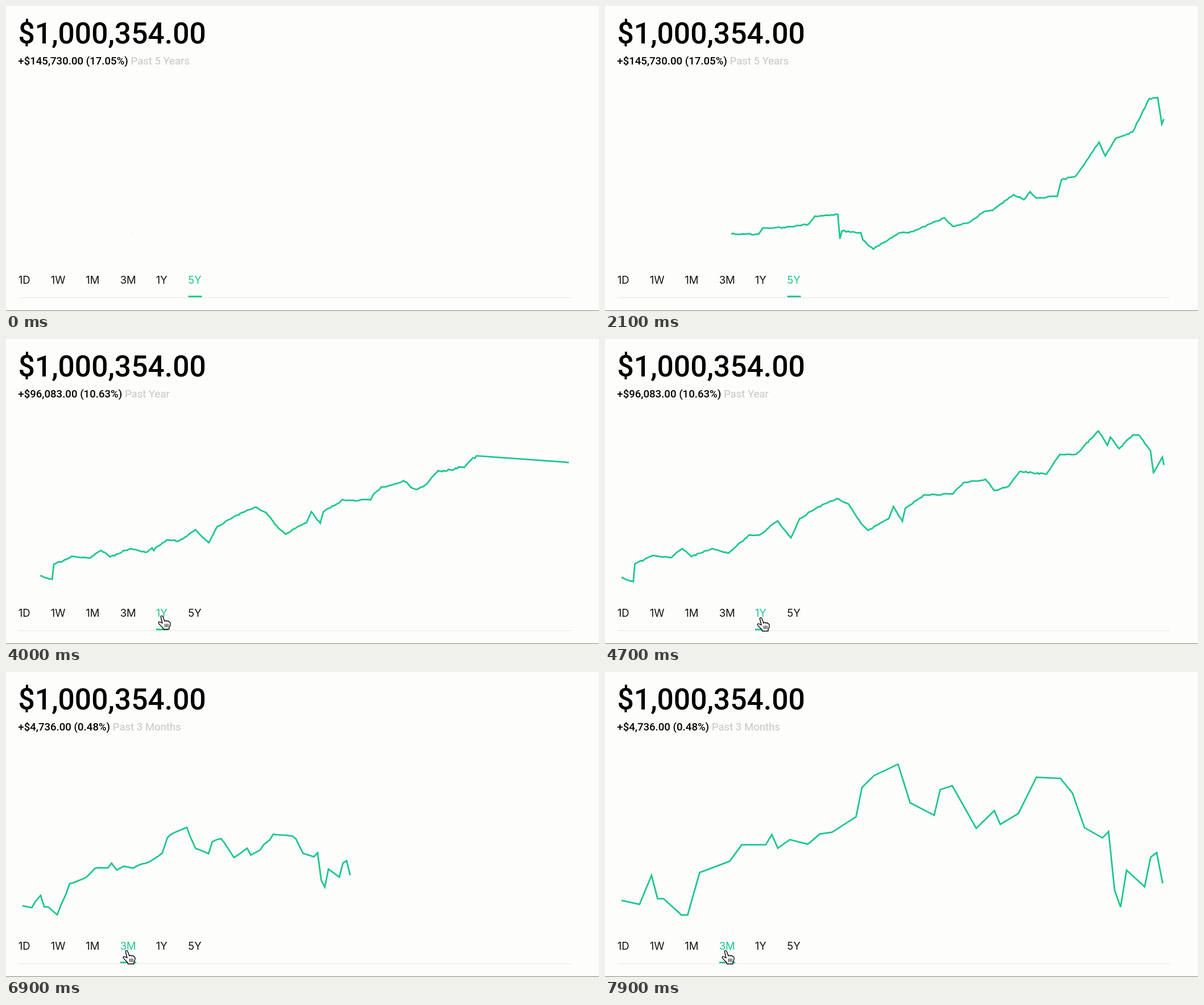
Recreate the animation shown at these times as an HTML page. Size 1043 px wide and 537 px high, loop 8 s.

```html
<!DOCTYPE html>
<html lang="en">
<head>
<meta charset="utf-8">
<title>Portfolio chart</title>
<style>
  html, body { margin: 0; width: 100%; height: 100%; overflow: hidden; background: #fdfdfb; }
  svg { display: block; width: 100%; height: 100%; }
  text { font-family: Roboto, sans-serif; }
  #total { font-size: 51.6px; font-weight: 500; }
  #summary { font-size: 18.6px; }
  #gain { font-weight: 500; }
  #span { fill: #c6c6c6; }
  #tabs text { font: 18.5px Inter, sans-serif; fill: #111; }
  #tabs text.on { fill: #1ec690; }
</style>
</head>
<body>
<svg viewBox="0 0 1043 537">
  <clipPath id="plot"><rect width="990" height="460"/></clipPath>
  <text id="total" x="21.5" y="65.7">$1,000,354.00</text>
  <text id="summary" x="21.3" y="103"><tspan id="gain"></tspan> <tspan id="span"></tspan></text>
  <g clip-path="url(#plot)">
    <polyline id="line" pathLength="1" fill="none" stroke="#1ec690" stroke-width="2.8"/>
  </g>
  <g id="tabs"></g>
  <rect x="22" y="513" width="972" height="1" fill="#e6e6e5"/>
  <rect id="underline" y="510" height="2.8" fill="#1ec690"/>
  <rect y="536" width="1043" height="1" fill="#85836c"/>
  <g id="hand" stroke="#000" stroke-width="1.4" stroke-linejoin="round">
    <path fill="#fff" d="M272.5 490C271.5 487 275 486.5 276 489L279 497C280 495.5 282 495.5 283 497
      C284.5 495.5 286 496.5 286.5 498C288 497.5 289 499 289 501C289.3 504 288 506 287 508V511H276.5
      L276 508.5C274 506.5 270 503 268.5 500.5C267.5 498.5 269.5 497 271.5 498.5L275 500.5Z"/>
    <path stroke-width="1.1" d="M279.7 501.5v6M282.4 501.5v6M285 501.5v6"/>
  </g>
</svg>
<script>
const LOOP = 8000, DRAW_TIME = 1500;
const LEFT = 29, WIDTH = 954;
const ENTRY = [1946, 289]; // where points without a predecessor fly in from
const $ = id => document.getElementById(id);
const mix = (a, b, p) => a + (b - a) * p;
const noise = i => { const n = Math.sin(i * 127.1) * 43758.5; return (n - Math.floor(n)) * 2 - 1; };

// CSS "ease" curve, cubic-bezier(.25, .1, .25, 1)
function ease(t) {
  if (t <= 0) return 0;
  if (t >= 1) return 1;
  const bezier = (a, b, s) => 3 * a * s * (1 - s) ** 2 + 3 * b * s * s * (1 - s) + s ** 3;
  let lo = 0, hi = 1;
  for (let i = 0; i < 24; i++) {
    const mid = (lo + hi) / 2;
    if (bezier(.25, .25, mid) < t) lo = mid; else hi = mid;
  }
  return bezier(.1, 1, lo);
}

// Samples the price: straight runs between turning points, with a little random roughness.
function series(count, xAt, rough, turns) {
  const xs = Array.from({ length: count }, (_, i) => xAt(i));
  const snap = x => xs.reduce((best, v) => Math.abs(v - x) < Math.abs(best - x) ? v : best);
  const keys = turns.trim().split(/\s+/).map(pair => {
    const [x, y] = pair.split(',').map(Number);
    return [snap(x), y];
  });
  return xs.map((x, i) => {
    const j = keys.findIndex(k => k[0] >= x);
    if (keys[j][0] === x) return [x, keys[j][1]];
    const [ax, ay] = keys[j - 1], [bx, by] = keys[j];
    return [x, mix(ay, by, (x - ax) / (bx - ax)) + rough * noise(i)];
  });
}

// Calendar day of a trading session, skipping weekends and the closures after certain sessions
function tradingDay(session, firstWeekday, closures) {
  const day = session + closures.filter(c => session > c).length;
  return day + 2 * Math.floor((day + firstWeekday) / 5);
}

const fiveYears = series(208, i => mix(222, 983, i / 207), 1.2, `
  222,401 270,402 277,391 317,390 358,384 369,370 408,367 412,410 417,396 449,399 453,412
  471,428 517,400 543,397 597,373 613,388 642,381 666,362 683,360 720,332 738,341 749,327
  760,338 796,335 804,306 830,299 848,272 855,261 870,240 880,264 899,233 928,222 957,163
  972,161 979,208 983,199`);

const oneYear = series(259, i => LEFT + WIDTH * tradingDay(i, 2, [40, 46, 50]) / 365, 1.2, `
  29,420 50,427 53,396 84,381 115,385 136,369 152,383 188,369 217,377 253,345 272,345
  303,320 326,350 342,316 371,298 408,281 430,291 450,324 463,337 499,316 507,295 522,321
  528,298 562,274 613,273 631,253 670,247 685,267 708,260 729,233 776,238 800,203 828,203
  868,162 884,187 890,173 904,193 929,169 939,169 960,197 964,235 980,208 983,222`);

const threeMonths = series(64, i => LEFT + (WIDTH - 1) * tradingDay(i, 4, [30]) / 90, 0, `
  29,402 61,409 82,358 92,399 103,399 135,428 145,428 166,353 220,333 241,304 283,304
  293,286 304,310 325,295 357,303 378,285 399,282 442,255 452,203 474,182 516,162 537,230
  579,252 590,207 611,200 653,275 685,244 696,268 727,249 759,185 802,187 823,213 844,274
  876,292 886,281 897,384 907,414 918,349 950,378 960,326 971,318 982,372`);

const views = [
  { start: 0, tab: '5Y', points: fiveYears, gain: '+$145,730.00 (17.05%)', span: 'Past 5 Years' },
  { start: 3192, tab: '1Y', points: oneYear, gain: '+$96,083.00 (10.63%)', span: 'Past Year' },
  { start: 6482, tab: '3M', points: threeMonths, gain: '+$4,736.00 (0.48%)', span: 'Past 3 Months' },
];

// Tabs follow one another with an even gap; each is as wide as its underline.
const TAB_GAP = 35;
const tabs = {};
let tabX = 22;
for (const [label, width] of Object.entries({ '1D': 22, '1W': 26.5, '1M': 25.5, '3M': 28, '1Y': 21.5, '5Y': 24 })) {
  const text = document.createElementNS('http://www.w3.org/2000/svg', 'text');
  text.textContent = label;
  text.setAttribute('x', tabX - .3);
  text.setAttribute('y', 488.5);
  $('tabs').append(text);
  tabs[label] = { x: tabX, width };
  tabX += width + TAB_GAP;
}

// Pointer offsets over time: [ms, dx, dy]
const pointerPath = [
  [2450, 18, 52], [3000, 0, 0], [4100, 0, 0], [4600, 0, 3], [5400, 0, 9], [6250, -62, 3], [LOOP, -62, 3],
];

function placePointer(time) {
  const next = pointerPath.findIndex(k => k[0] > time);
  $('hand').style.display = next < 1 ? 'none' : '';
  if (next < 1) return;
  const [t0, x0, y0] = pointerPath[next - 1], [t1, x1, y1] = pointerPath[next];
  const u = (time - t0) / (t1 - t0), p = u * u * (3 - 2 * u);
  $('hand').setAttribute('transform', `translate(${mix(x0, x1, p)} ${mix(y0, y1, p)})`);
}

function render(time) {
  const index = views.findLastIndex(v => time >= v.start);
  const view = views[index], before = views[index - 1];
  const p = ease((time - view.start) / DRAW_TIME);

  $('gain').textContent = view.gain;
  $('span').textContent = view.span;
  for (const text of $('tabs').children) text.classList.toggle('on', text.textContent === view.tab);
  $('underline').setAttribute('x', tabs[view.tab].x);
  $('underline').setAttribute('width', tabs[view.tab].width);

  const points = before
    ? view.points.map(([x, y], i) => {
        const [fromX, fromY] = before.points[i] || ENTRY;
        return [mix(fromX, x, p), mix(fromY, y, p)];
      })
    : view.points;
  const line = $('line');
  line.setAttribute('points', points.map(q => q.map(n => n.toFixed(2))).join(' '));
  line.setAttribute('stroke-dasharray', before || p === 1 ? 'none' : `${p} 2`);
  line.style.display = p === 0 && !before ? 'none' : '';

  placePointer(time);
}

const began = performance.now();
function tick() {
  render((performance.now() - began) % LOOP);
  requestAnimationFrame(tick);
}
render(0);
requestAnimationFrame(tick);
</script>
</body>
</html>
```
